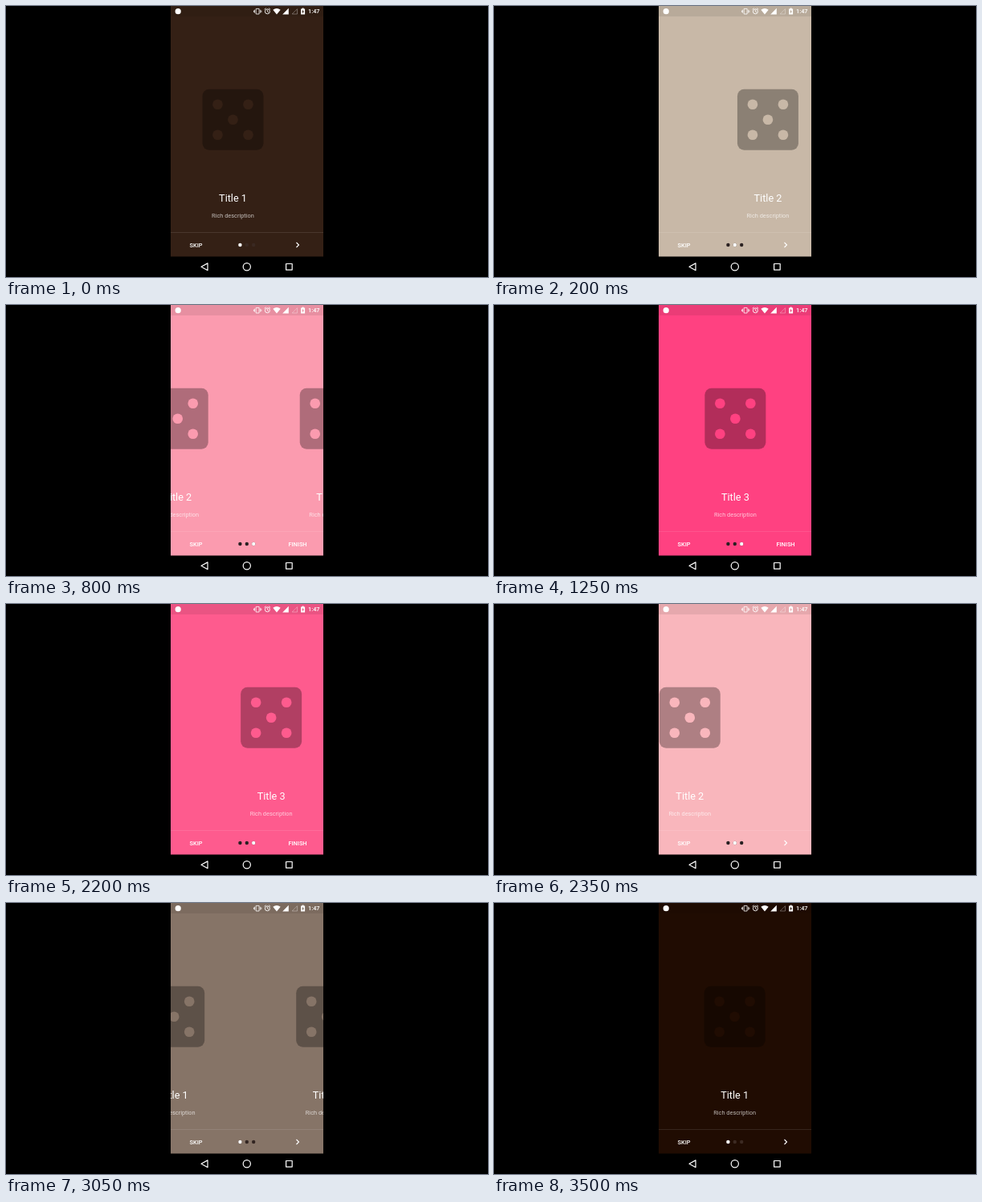
Write an HTML page that moves like this. It is 600 px wide and 338 px high and loops after 3.7 s.

```html
<!DOCTYPE html>
<html lang="en">
<head>
<meta charset="utf-8">
<title>Intro slides</title>
<style>
  html, body { margin: 0; height: 100%; overflow: hidden; background: #000; }
  svg { display: block; width: 100vw; height: 100vh; }
  text { font-family: Roboto, sans-serif; font-size: 7.39px; fill: #fff; text-anchor: middle; }
  .title { font-size: 12.67px; }
  .note { fill-opacity: .7; }
  .bold { font-weight: 500; }
  .line { fill: none; stroke: #fff; }
</style>
</head>
<body>
<svg viewBox="0 0 600 338">
  <defs>
    <clipPath id="screen"><rect x="205" width="190" height="312.6"/></clipPath>
    <mask id="pips">
      <rect x="-40" y="-40" width="80" height="80" fill="#fff"/>
      <circle r="6.33"/>
      <circle cx="-19" cy="-19" r="6.33"/><circle cx="19" cy="-19" r="6.33"/>
      <circle cx="-19" cy="19" r="6.33"/><circle cx="19" cy="19" r="6.33"/>
    </mask>
  </defs>
  <rect width="600" height="338"/>
  <g clip-path="url(#screen)">
    <rect id="back" x="205" width="190" height="313"/>
    <rect x="205" width="190" height="13" fill-opacity=".08"/>
    <g id="slides"></g>
    <rect x="205" y="282" width="190" height="1" fill="#fff" fill-opacity=".1"/>
    <text class="bold" x="236.5" y="300.7">SKIP</text>
    <text class="bold" id="finish" x="363" y="300.7">FINISH</text>
    <path class="line" id="next" d="M361.5 295l3 3-3 3" stroke-width="1.1"/>
    <g id="dots">
      <circle cx="291.4" cy="298" r="2.2"/><circle cx="299.8" cy="298" r="2.2"/><circle cx="308.2" cy="298" r="2.2"/>
    </g>
    <circle id="active" cy="298" r="2.2" fill="#fff"/>
  </g>

  <!-- status bar -->
  <g fill="#fff">
    <circle cx="214.2" cy="6.7" r="3.6"/>
    <path class="line" d="M311.2 3.4h3.9v6.6h-3.9zM309.6 4.7v4M316.7 4.7v4M308.5 5.6v2.2M317.8 5.6v2.2" stroke-width=".8"/>
    <path class="line" d="M325.4 4.6v2.4l1.6 1M321.6 4.3l2-1.6M329.2 4.3l-2-1.6" stroke-width=".8"/>
    <circle class="line" cx="325.4" cy="6.8" r="3" stroke-width=".9"/>
    <path d="M332.3 4.7q4.7-3.6 9.4 0l-4.7 5.8z"/>
    <path d="M351.8 2.8v7.6h-7.6z"/>
    <path class="line" d="M362.5 3.7v6.3h-6.3z" stroke-width=".7" stroke-opacity=".45"/>
    <path fill-rule="evenodd" d="M368.7 2.6h1.8v.9h1.6v7h-5v-7h1.6zM369.9 4.6l-1.7 2.8h1.1v2l1.8-2.8h-1.2z"/>
  </g>
  <text class="bold" x="383.3" y="9.4">1:47</text>

  <!-- navigation bar -->
  <g class="line" stroke-width="1.2" stroke-linejoin="round">
    <path d="M251 320.9v8.8l-8-4.4z"/>
    <circle cx="299.8" cy="325.3" r="4.6"/>
    <rect x="348.6" y="321.5" width="7.6" height="7.6"/>
  </g>
</svg>
<script>
const LOOP = 3700, STEP = 50, PAGE = 190;
const COLORS = [[32, 12, 2], [247, 231, 213], [255, 64, 129]];
const DOTS = [[60, 42, 34], [40, 32, 34], [40, 32, 34]];
const MOVES = [
  { start: -16, length: 680, from: 0, to: 1 },
  { start: 699, length: 722, from: 1, to: 2 },
  { start: 2171, length: 680, from: 2, to: 1 },
  { start: 2935, length: 680, from: 1, to: 0 },
];
const $ = id => document.getElementById(id);
const clamp = v => Math.min(1, Math.max(0, v));
const lerp = (a, b, k) => a + (b - a) * k;

function blend(colors, page) {
  const i = Math.min(1, Math.floor(page));
  return `rgb(${colors[i].map((c, n) => Math.round(lerp(c, colors[i + 1][n], page - i)))})`;
}

$('slides').innerHTML = COLORS.map((_, i) => `<g>
  <rect x="-38" y="-38" width="76" height="76" rx="8.4" fill-opacity=".3" mask="url(#pips)" transform="translate(299.75 141.75)"/>
  <text class="title" x="299.75" y="244.2">Title ${i + 1}</text>
  <text class="note" x="299.75" y="264.2">Rich description</text>
</g>`).join('');

function draw(time) {
  const move = MOVES.filter(m => m.start <= time).pop();
  const k = 1 - (1 - clamp((time - move.start) / move.length)) ** 4;
  const page = lerp(move.from, move.to, k);
  const selected = lerp(move.from, move.to, clamp((k - .17) / .27));

  [...$('slides').children].forEach((slide, i) =>
    slide.setAttribute('transform', `translate(${(i - page) * PAGE})`));
  $('back').setAttribute('fill', blend(COLORS, page));
  $('dots').setAttribute('fill', blend(DOTS, page));
  $('active').setAttribute('cx', 291.4 + selected * 8.4);
  $('finish').style.opacity = clamp(selected - 1);
  $('next').style.opacity = clamp(2 - selected);
}

const begin = performance.now();
function tick() {
  const time = (performance.now() - begin) % LOOP;
  draw(Math.floor(time / STEP) * STEP);
  requestAnimationFrame(tick);
}
tick();
</script>
</body>
</html>
```
